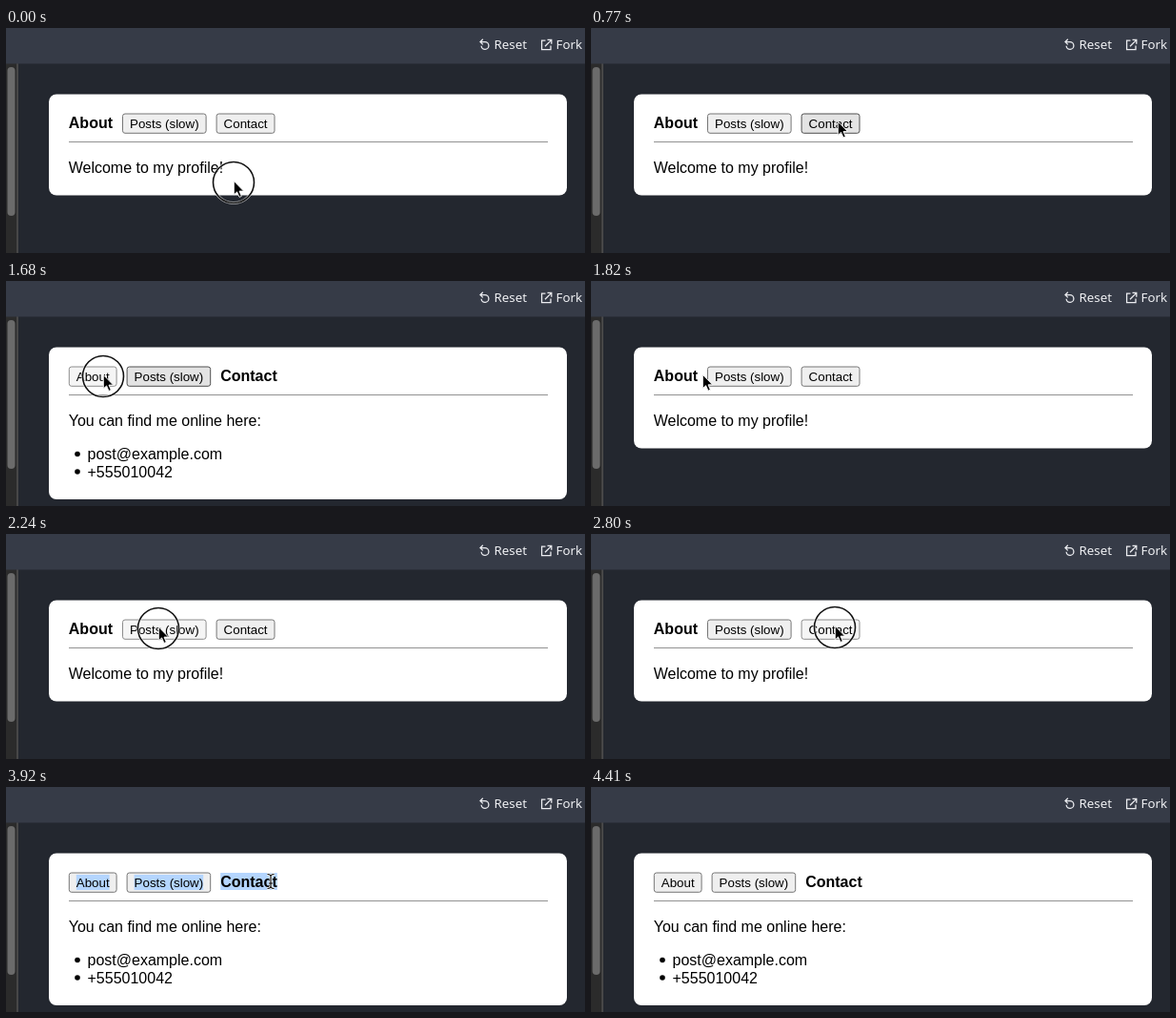
An HTML page for the animation above (5.25 s loop, 608 by 236 pixels).

```html
<!DOCTYPE html>
<html lang="en">
<head>
<meta charset="utf-8">
<title>Profile tabs</title>
<style>
  html, body { margin: 0; width: 100%; height: 100%; overflow: hidden; background: #23272f; }
  svg { display: block; width: 608px; height: 236px; }
  text { font: 16px "Liberation Sans", Arial, sans-serif; white-space: pre; }
  .title { font-weight: bold; }
  .btn text { font-size: 13.333px; }
  .btn rect { fill: #efefef; stroke: #767676; }
  .btn.hover rect { fill: #e3e3e3; stroke: #4f4f4f; }
  .btn.active rect { fill: #f5f5f5; stroke: #8d8d8d; }
  .bar text { font: 500 13.3px "Noto Sans", "Open Sans", sans-serif; fill: #f0f1f4; }
  .icon { fill: none; stroke: #ebecf0; stroke-width: 1.3; }
  .select { fill: #b4d5fe; }
</style>
</head>
<body>
<svg viewBox="0 0 608 236">
  <rect width="608" height="236" fill="#23272f"/>
  <rect y="37" width="12" height="199" fill="#2b2b2b"/>
  <rect x="11" y="37" width="2" height="199" fill="#474747"/>
  <rect x="1.5" y="41" width="8" height="156" rx="4" fill="#6b6b6b"/>
  <g class="bar">
    <rect width="608" height="37.5" fill="#363b47"/>
    <path class="icon" d="M498.2 14.6H503a3.9 3.9 0 1 1-3.9 4.2M500.8 11.8l-2.8 2.8 2.8 2.8"/>
    <text x="512.5" y="22">Reset</text>
    <path class="icon" d="M566.5 13.2H562.6V22.6H572V18.6M568.5 12.4H572.8V16.7M572.6 12.6L566 19.2"/>
    <text x="577.5" y="22">Fork</text>
  </g>
  <rect id="card" x="45" y="69.5" width="544" height="106" rx="8" fill="#fff"/>
  <path d="M66 119.5H569" stroke="#929292"/>
  <g id="about">
    <text x="65.7" y="152">Welcome to my profile!</text>
  </g>
  <g id="contact">
    <text x="65.7" y="152">You can find me online here:</text>
    <circle cx="75" cy="181.5" r="2.8"/>
    <text x="85.5" y="187">post@example.com</text>
    <circle cx="75" cy="200" r="2.8"/>
    <text x="85.5" y="205.5">+555010042</text>
  </g>
  <g id="tabs"></g>
  <g id="ring" fill="none">
    <circle stroke="#fff" stroke-opacity=".65" stroke-width="3"/>
    <circle stroke="#111" stroke-width="1.6"/>
  </g>
  <path id="arrow" d="M0 0V14.4L3.3 11.4 5.7 16.9 8 15.9 5.7 10.6H10.3Z" fill="#000" stroke="#fff" stroke-width=".9"/>
  <g id="beam" fill="none">
    <path id="stem" d="M-3.5 -7.5Q0 -7.5 0 -5V5Q0 7.5 -3.5 7.5M3.5 -7.5Q0 -7.5 0 -5V5Q0 7.5 3.5 7.5M-2 2H2" stroke="#fff" stroke-width="2.4"/>
    <use href="#stem" style="stroke:#000"/>
    <path d="M-3.5 -7.5Q0 -7.5 0 -5V5Q0 7.5 -3.5 7.5M3.5 -7.5Q0 -7.5 0 -5V5Q0 7.5 3.5 7.5M-2 2H2" stroke="#000" stroke-width="1.1"/>
  </g>
</svg>
<script>
const LOOP = 5250, STEP = 70;
const $ = id => document.getElementById(id);

// Tabs: label, button width, width of the bold title
const TABS = [["About", 50.8, 46.2], ["Posts (slow)", 88.6, 0], ["Contact", 61.9, 59.6]];

// Pointer stops: time, x, y
const STOPS = [
  [70, 239, 162], [490, 254.5, 109], [630, 254.5, 109], [770, 259, 99.5],
  [1050, 259, 99.5], [1540, 102, 100], [1680, 102, 100], [2100, 160, 99],
  [2240, 160, 99], [2520, 256, 98], [3640, 256, 98], [3710, 257.5, 98],
  [3780, 257.5, 98], [3920, 278, 99], [4060, 358, 150], [4340, 328, 202]
];

// Clicks: ring appears, ring vanishes
const CLICKS = [
  [0, 140], [980, 1120], [1610, 1750], [2170, 2310], [2590, 2660],
  [2800, 2870], [3010, 3150], [3290, 3500], [4060, 4130]
];

const within = (t, a, b) => t >= a && t < b;
const show = (el, on) => el.setAttribute("visibility", on ? "visible" : "hidden");
const move = (el, x, y) => el.setAttribute("transform", `translate(${x} ${y})`);

function pointer(t) {
  const i = STOPS.findIndex(s => s[0] > t);
  if (i === 0) return STOPS[0].slice(1);
  if (i < 0) return STOPS[STOPS.length - 1].slice(1);
  const [t0, x0, y0] = STOPS[i - 1], [t1, x1, y1] = STOPS[i];
  const k = (t - t0) / (t1 - t0), e = k * k * (3 - 2 * k);
  return [x0 + (x1 - x0) * e, y0 + (y1 - y0) * e];
}

// Draws the tab row and returns true when the pointer is over the title
function drawTabs(page, x, y, t, pressed) {
  const selected = within(t, 3500, 4060);
  let left = 65.8, overTitle = false, out = "";
  TABS.forEach(([label, width, bold], i) => {
    const isTitle = i === page, w = isTitle ? bold : width;
    const over = within(y, 89, 111) && within(x, left, left + w);
    if (isTitle) {
      overTitle = over;
      if (selected) out += `<rect class="select" x="${left}" y="90" width="${w}" height="18"/>`;
      out += `<text class="title" x="${left}" y="105">${label}</text>`;
    } else {
      const lingering = i === 1 && within(t, 1330, 1750);
      const look = over && pressed ? "active" : over || lingering ? "hover" : "";
      const mark = selected
        ? `<rect class="select" x="${left + 8}" y="92" width="${w - 16}" height="16" style="fill:#b4d5fe;stroke:none"/>` : "";
      out += `<g class="btn ${look}"><rect x="${left + .5}" y="90" width="${w - 1}" height="20.3" rx="2.5"/>` +
        `${mark}<text x="${left + 8}" y="104.8">${label}</text></g>`;
    }
    left += w + 10;
  });
  $("tabs").innerHTML = out;
  return overTitle;
}

function draw(time) {
  const t = Math.floor(time % LOOP / STEP) * STEP;
  const page = within(t, 1120, 1750) || t >= 3430 ? 2 : 0;
  const [x, y] = pointer(t);
  const click = CLICKS.find(([a, b]) => within(t, a, b));
  const visible = t < 4410;

  $("card").setAttribute("height", page ? 159.5 : 106);
  show($("about"), page === 0);
  show($("contact"), page === 2);

  const overTitle = drawTabs(page, visible ? x : -99, y, t, click);
  const beam = overTitle || within(t, 3290, 3990);
  show($("arrow"), visible && !beam);
  show($("beam"), visible && beam);
  move($("arrow"), x + .3, y - 1.5);
  move($("beam"), x, y);

  show($("ring"), click);
  if (click) {
    const r = t < STEP || t >= click[1] - STEP ? 21.5 : 16.5;
    for (const c of $("ring").children) c.setAttribute("r", r);
    move($("ring"), x, y);
  }
}

const start = performance.now();
function tick() {
  draw(performance.now() - start);
  requestAnimationFrame(tick);
}
tick();
</script>
</body>
</html>
```
